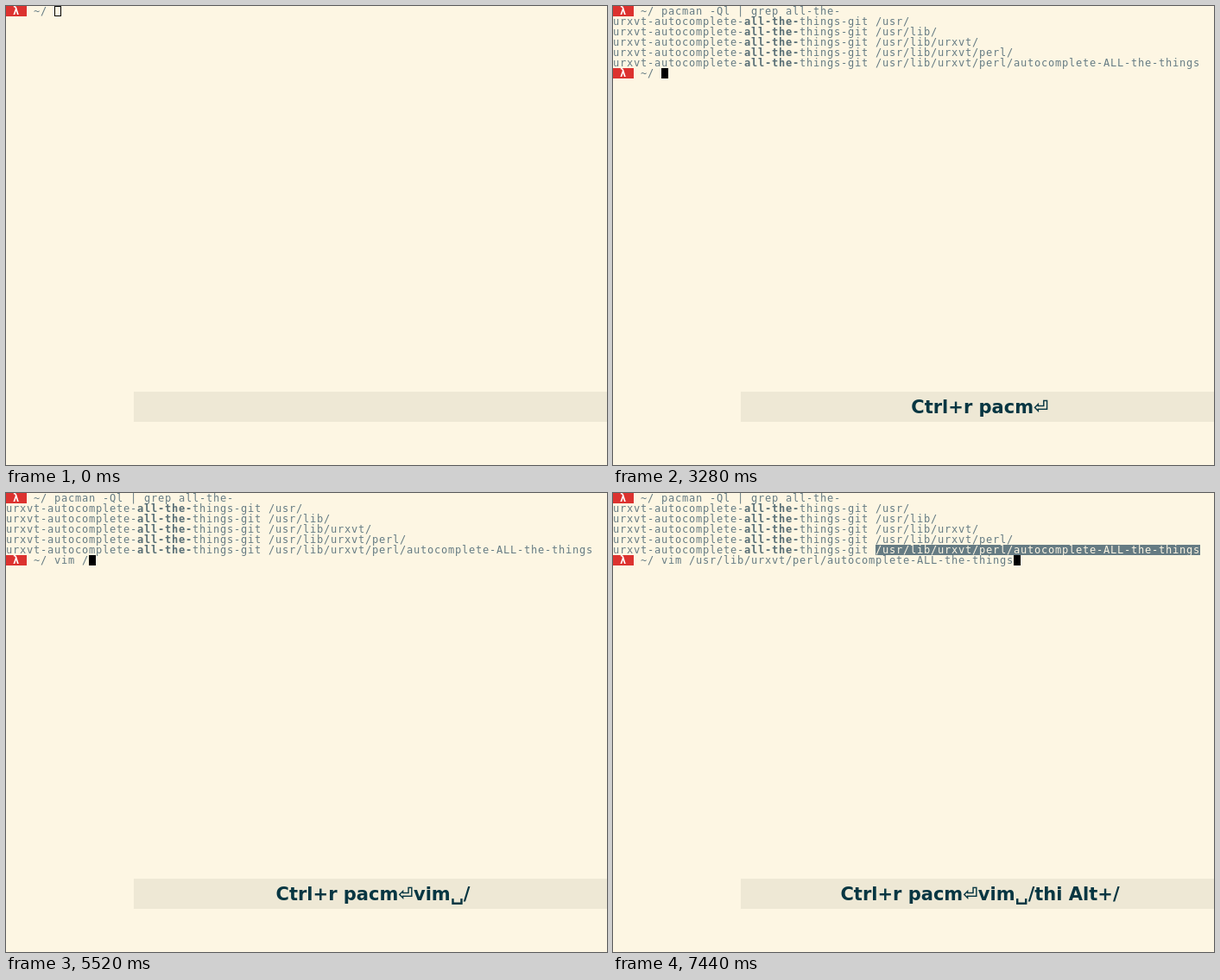
An HTML page for the animation above (8000 ms loop, 696 by 532 pixels).

```html
<!DOCTYPE html>
<html lang="en">
<head>
<meta charset="utf-8">
<title>Terminal history search and completion</title>
<style>
  html, body { margin: 0; width: 100%; height: 100%; overflow: hidden; background: #fdf6e3; }
  svg { display: block; }
  text { white-space: pre; }
  #term text { font: 12px "DejaVu Sans Mono", "Liberation Mono", monospace; fill: #657b83; }
  #term .bold { font-weight: bold; fill: #586e75; }
  #term .light { fill: #fdf6e3; }
  #term .lambda { font-weight: bold; fill: #fff; }
  #keys { font: bold 21px "DejaVu Sans", sans-serif; fill: #073642; text-anchor: middle; }
</style>
</head>
<body>
<svg width="696" height="532" viewBox="0 0 696 532">
  <rect width="696" height="532" fill="#fdf6e3"/>
  <rect x="148" y="447" width="548" height="35" fill="#eee8d5"/>
  <text id="keys" x="425" y="472"></text>
  <g id="term"></g>
</svg>
<script>
const LOOP = 8000, COL = 8, ROW = 12, INPUT = 7;
const term = document.getElementById("term");
const keys = document.getElementById("keys");

const HISTORY = "pacman -Ql | grep all-the-";
const FILE = "/usr/lib/urxvt/perl/autocomplete-ALL-the-things";
const PATHS = ["/usr/", "/usr/lib/", "/usr/lib/urxvt/", "/usr/lib/urxvt/perl/", FILE];

function add(name, attrs, content = "") {
  const el = document.createElementNS("http://www.w3.org/2000/svg", name);
  for (const key in attrs) el.setAttribute(key, attrs[key]);
  el.textContent = content;
  term.append(el);
}

// Each character sits in its own terminal cell.
function write(col, row, str, cls = "") {
  const x = [...str].map((_, i) => (col + i) * COL).join(" ");
  add("text", { x, y: row * ROW + 10, class: cls }, str);
}

function fill(col, row, cells, color) {
  add("rect", { x: col * COL, y: row * ROW, width: cells * COL, height: ROW, fill: color });
}

function cursor(col, row, char = "") {
  fill(col, row, 1, "#000");
  if (char) write(col, row, char, "light");
}

function prompt(row, input = "") {
  fill(0, row, 3, "#dc322f");
  write(1, row, "λ", "lambda");
  write(4, row, "~/");
  if (input) write(INPUT, row, input);
}

function idle(focused) {
  prompt(0);
  if (focused) cursor(INPUT, 0);
  else add("rect", { x: 56.5, y: 0.5, width: 7, height: 11, fill: "none", stroke: "#000" });
}

function search(query) {
  prompt(0, query && HISTORY);
  if (query.length > 1) {
    add("rect", { x: (INPUT + 1) * COL, y: 11, width: (query.length - 1) * COL, height: 1, fill: "#657b83" });
  }
  cursor(INPUT, 0, query[0]);
  write(0, 1, "bck-i-search: " + query + "_");
}

function running() {
  prompt(0, HISTORY);
  cursor(0, 1);
}

function listing(input, selected) {
  prompt(0, HISTORY);
  PATHS.forEach((path, i) => {
    const row = i + 1, marked = selected && path === FILE;
    write(0, row, "urxvt-autocomplete-");
    write(19, row, "all-the-", "bold");
    write(27, row, "things-git");
    if (marked) fill(38, row, path.length, "#657b83");
    write(38, row, path, marked ? "light" : "");
  });
  prompt(6, input);
  cursor(INPUT + input.length, 6);
}

// Start time, shown keys, screen
const RAN = "Ctrl+r pacm⏎";
const STEPS = [
  [0, "", () => idle(false)],
  [80, "", () => idle(true)],
  [2080, "Ctrl+r", () => search("")],
  [2320, "Ctrl+r p", () => search("p")],
  [2400, "Ctrl+r pac", () => search("pac")],
  [2480, "Ctrl+r pacm", () => search("pacm")],
  [3120, "Ctrl+r pacm", running],
  [3200, RAN, running],
  [3280, RAN, () => listing("")],
  [4560, RAN + "v", () => listing("v")],
  [4640, RAN + "vi", () => listing("vi")],
  [4800, RAN + "vim", () => listing("vim")],
  [4960, RAN + "vim␣", () => listing("vim ")],
  [5520, RAN + "vim␣/", () => listing("vim /")],
  [5920, RAN + "vim␣/t", () => listing("vim /t")],
  [6160, RAN + "vim␣/th", () => listing("vim /th")],
  [6640, RAN + "vim␣/th", () => listing("vim /thi")],
  [6720, RAN + "vim␣/thi", () => listing("vim /thi")],
  [7440, RAN + "vim␣/thi Alt+/", () => listing("vim " + FILE, true)],
];

let shown, start;
function frame(now) {
  start ??= now;
  const time = (now - start) % LOOP;
  const step = STEPS.findLast(([at]) => at <= time);
  if (step !== shown) {
    shown = step;
    term.replaceChildren();
    keys.textContent = step[1];
    step[2]();
  }
  requestAnimationFrame(frame);
}
requestAnimationFrame(frame);
</script>
</body>
</html>
```
